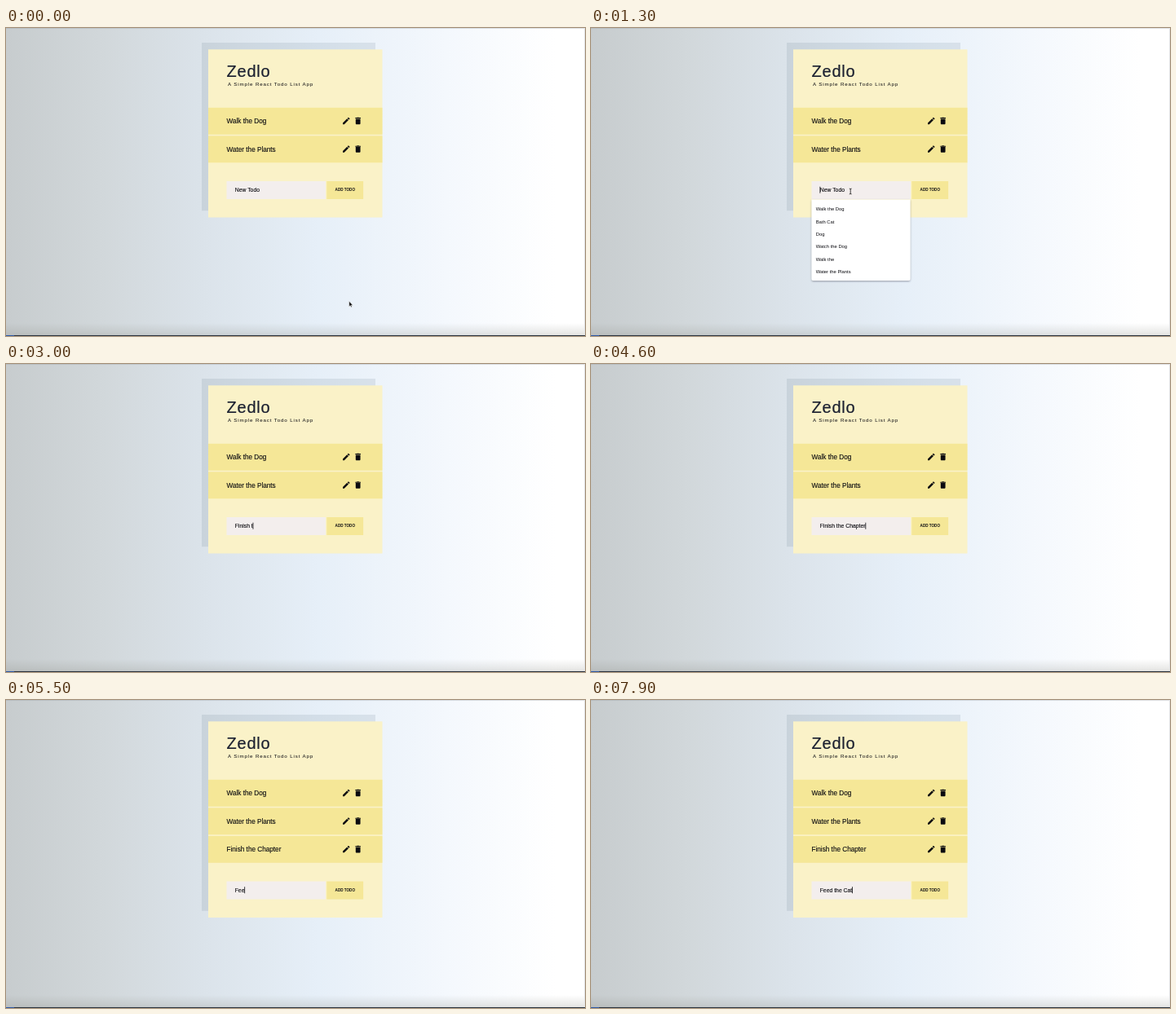
Recreate the animation shown at these times as an HTML page. Size 710 by 378 pixels, loop 8 s.

```html
<!DOCTYPE html>
<html lang="en">
<head>
<meta charset="utf-8">
<title>Todo list</title>
<style>
  html, body { margin: 0; width: 100%; height: 100%; overflow: hidden; }
  svg { display: block; width: 710px; height: 378px; font-family: "Liberation Sans", Arial, sans-serif; }
  text { fill: #0b0b10; white-space: pre; }
  .title { font-size: 20px; letter-spacing: .8px; fill: #1b2030; stroke: #1b2030; stroke-width: .2px; }
  .sub { font-size: 6.2px; letter-spacing: .86px; }
  .todo { font-size: 8.2px; }
  .todo, .field { stroke: #0b0b10; stroke-width: .12px; }
  .field { font-size: 6.85px; }
  .add { font-size: 4.6px; font-weight: bold; }
  .hint { font-size: 5.85px; }
  .card { fill: #faf2c8; }
  .row { fill: #f5e797; }
</style>
</head>
<body>
<svg viewBox="0 0 710 378">
  <defs>
    <linearGradient id="sky">
      <stop offset="0" stop-color="#c7ccce"/>
      <stop offset=".16" stop-color="#d1d7da"/>
      <stop offset=".34" stop-color="#dbe3ea"/>
      <stop offset=".54" stop-color="#e6eff8"/>
      <stop offset=".76" stop-color="#f4f8fd"/>
      <stop offset=".95" stop-color="#fff"/>
    </linearGradient>
    <linearGradient id="foot" x2="0" y2="1">
      <stop offset="0" stop-color="#85857c" stop-opacity="0"/>
      <stop offset="1" stop-color="#85857c" stop-opacity=".22"/>
    </linearGradient>
    <filter id="soft" x="-10%" y="-10%" width="120%" height="120%">
      <feDropShadow dx="0" dy="1" stdDeviation="1" flood-color="#334" flood-opacity=".45"/>
    </filter>
    <g id="icons" fill="#0b0b10">
      <path transform="translate(411.6 -5.6) scale(.47)" d="M3 17.25V21h3.75L17.81 9.94l-3.75-3.75L3 17.25zM20.71 7.04a1 1 0 0 0 0-1.41l-2.34-2.34a1 1 0 0 0-1.41 0l-1.83 1.83 3.75 3.75z"/>
      <path transform="translate(425.9 -5.8) scale(.48)" d="M6 19c0 1.1.9 2 2 2h8c1.1 0 2-.9 2-2V7H6zM19 4h-3.5l-1-1h-5l-1 1H5v2h14z"/>
    </g>
  </defs>

  <rect width="710" height="378" fill="url(#sky)"/>
  <rect y="362" width="710" height="15" fill="url(#foot)"/>
  <rect width="710" height="1" fill="#8b949c" opacity=".28"/>
  <rect x="709" width="1" height="377" fill="#e6e7e9"/>
  <rect y="377" width="710" height="1" fill="#2b3440"/>
  <rect y="377" width="10" height="1" fill="#2c57a5"/>

  <rect id="shade" x="240" y="18" width="213" fill="#3c5064" fill-opacity=".11"/>
  <rect id="card" class="card" x="248" y="26.3" width="213.5"/>
  <text class="title" x="270.5" y="60">Zedlo</text>
  <text class="sub" x="272" y="71.4">A Simple React Todo List App</text>
  <g id="rows"></g>

  <g id="form">
    <rect x="270.5" y="188" width="121.5" height="22" fill="#f3eeed"/>
    <rect class="row" x="393.3" y="188" width="44.8" height="22"/>
    <text class="add" x="403.6" y="200.3">ADD TODO</text>
    <text id="field" class="field" x="280.7" y="201.1"></text>
    <rect id="caret" y="194.7" width=".8" height="8" fill="#0b0b10"/>
  </g>

  <g id="hints">
    <path d="M270.5 210.5H391.5V308a2 2 0 0 1-2 2H272.5a2 2 0 0 1-2-2z" fill="#fff" filter="url(#soft)"/>
  </g>

  <path id="arrow" d="M0 0V6.6L1.5 5.3 2.5 7.5 3.6 7 2.6 4.9H4.6Z" fill="#111" stroke="#fff" stroke-width=".5"/>
  <path id="beam" d="M-1.4-3.4Q0-3.4 0-2.4Q0-3.4 1.4-3.4M0-2.4V2.4M-1.4 3.4Q0 3.4 0 2.4Q0 3.4 1.4 3.4" fill="none" stroke="#111" stroke-width=".8"/>
</svg>
<script>
const LOOP = 8000, FOCUS = 1200, SUBMIT = 4700, PITCH = 34.55;
const todos = ["Walk the Dog", "Water the Plants", "Finish the Chapter"];
const history = ["Walk the Dog", "Bath Cat", "Dog", "Watch the Dog", "Walk the", "Water the Plants"];

// one key time per character
const typing = [
  { text: "Finish the Chapter", from: FOCUS,
    keys: [1900, 2100, 2200, 2300, 2400, 2600, 2800, 3000, 3200, 3300, 3400, 3700, 3800, 3900, 4000, 4100, 4300, 4400] },
  { text: "Feed the Cat", from: SUBMIT,
    keys: [5200, 5300, 5500, 5600, 5700, 6800, 6900, 7000, 7200, 7500, 7700, 7800] }
];
const FIRST_KEY = typing[0].keys[0];

const $ = id => document.getElementById(id);
const show = (id, on) => $(id).setAttribute("visibility", on ? "visible" : "hidden");
const move = (id, x, y) => $(id).setAttribute("transform", `translate(${x} ${y})`);

$("rows").innerHTML = todos.map((name, i) => `
  <g id="row${i}" transform="translate(0 ${i * PITCH})">
    <rect class="row" x="248" y="97.8" width="213.5" height="32.9"/>
    <text class="todo" x="270.5" y="117.1">${name}</text>
    <use href="#icons" y="114"/>
  </g>`).join("");
$("hints").insertAdjacentHTML("beforeend", history.map((name, i) =>
  `<text class="hint" x="275.7" y="${224.2 + i * 15.36}">${name}</text>`).join(""));

function drawPointer(t) {
  const p = Math.min(1, Math.max(0, (t - 200) / 800));
  const ease = p * p * (3 - 2 * p);
  const x = 420.7 - 102.5 * ease, y = 335.3 - 134.8 * ease;
  const shown = t < FIRST_KEY, overField = y < 210;
  move("arrow", x, y);
  move("beam", x, y);
  show("arrow", shown && !overField);
  show("beam", shown && overField);
}

function drawField(t) {
  const { text, from, keys } = typing[t < SUBMIT ? 0 : 1];
  const count = keys.filter(k => k <= t).length;
  const last = count ? keys[count - 1] : from;
  const field = $("field");
  field.textContent = text.slice(0, count) || "New Todo";
  const width = count ? field.getComputedTextLength() : 0;
  $("caret").setAttribute("x", 280.5 + width);
  show("caret", t >= FOCUS && (t - last) % 1000 < 500);
}

function draw(t) {
  const added = t >= SUBMIT, extra = added ? PITCH : 0;
  $("card").setAttribute("height", 206.2 + extra);
  $("shade").setAttribute("height", 206.2 + extra);
  show("row2", added);
  move("form", 0, extra);
  show("hints", t >= FOCUS && t < FIRST_KEY);
  drawField(t);
  drawPointer(t);
}

function tick() {
  draw(performance.now() % LOOP);
  requestAnimationFrame(tick);
}
tick();
</script>
</body>
</html>
```
